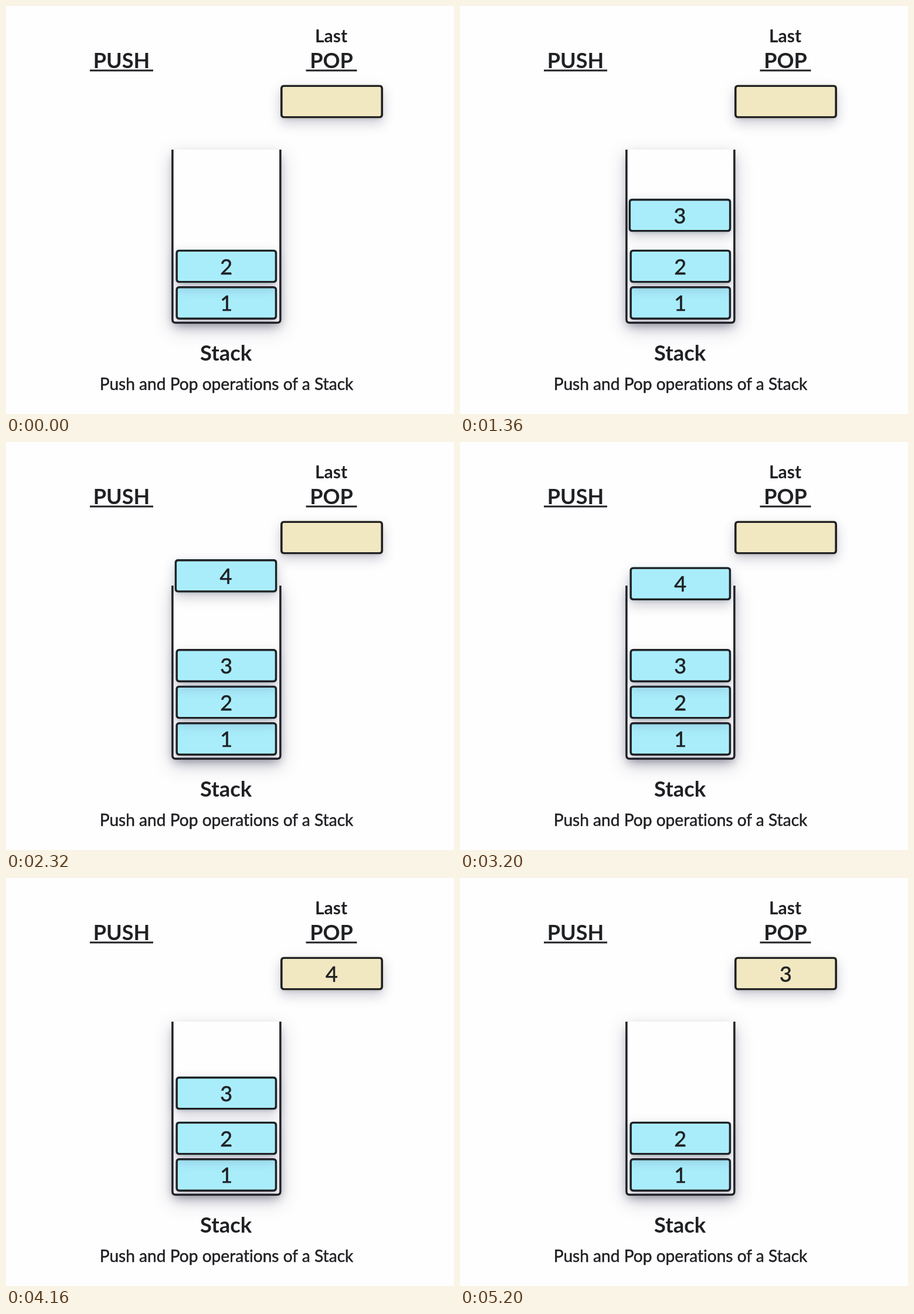
Animation of 764x696 px, one loop 5440 ms. Source, as an HTML page:

```html
<!DOCTYPE html>
<html lang="en">
<head>
<meta charset="utf-8">
<title>Stack push and pop</title>
<style>
  html, body { margin: 0; width: 100%; height: 100%; overflow: hidden; background: #fefefe; }
  #stage { position: relative; width: 764px; height: 696px; overflow: hidden; font-family: Lato, sans-serif; color: #202124; }
  #stage > * { position: absolute; box-sizing: border-box; }
  svg { left: 0; top: 0; }
  svg text { fill: #202124; text-anchor: middle; font-weight: 700; font-size: 36px; }
  svg .caption { font-size: 28.1px; font-weight: 400; font-variant-ligatures: none; stroke: #202124; stroke-width: .5px; }
  #well {
    left: 282px; top: 245px; width: 188px; height: 297px; border-radius: 0 0 7px 7px;
    box-shadow: rgba(50,50,93,.25) 0 10px 30px 0, rgba(0,0,0,.25) 0 6px 14px -4px;
  }
  .block {
    left: 0; top: 0; height: 57px; border-radius: 6px;
    font-size: 36px; line-height: 57px; text-align: center; -webkit-text-stroke: .6px #202124;
  }
</style>
</head>
<body>
<div id="stage">
  <div id="well"></div>
  <svg width="764" height="696" viewBox="0 0 764 696">
    <text x="197" y="106">PUSH</text>
    <rect x="143" y="108.5" width="108" height="3" fill="#202124"/>
    <text x="555" y="106">POP</text>
    <rect x="511.5" y="108.5" width="87" height="3" fill="#202124"/>
    <text x="554.5" y="62" style="font-size:30px">Last</text>
    <text x="375.2" y="605" style="font-size:36.4px">Stack</text>
    <text class="caption" x="376" y="654.5">Push and Pop operations of a Stack</text>
    <path d="M283.9 245V535q0 5.2 5.2 5.2H462.7q5.2 0 5.2-5.2V245" fill="none" stroke="#202124" stroke-width="3.5"/>
  </svg>
</div>
<script>
const LOOP = 5440, TICK = 80;
const TOP = 134.5, PUSH_X = 109, MID_X = 287.5, REST_X = 289.3, POP_X = 468;
const WIDE = 175, SNUG = 173;
const BLUE = [169, 237, 251], CREAM = [241, 232, 194];
const stage = document.getElementById("stage");

const clamp = v => Math.min(1, Math.max(0, v));
const mix = (a, b, p) => a + (b - a) * p;
const ramp = (t, start, span) => clamp((t - start) / span);
const ease = (t, start, span) => (1 - Math.cos(Math.PI * ramp(t, start, span))) / 2;
const restY = n => 478 - 62.5 * (n - 1);

function makeBlock(label) {
  const el = document.createElement("div");
  el.className = "block";
  el.textContent = label;
  stage.appendChild(el);
  return el;
}

// The outline is an inset shadow, so it can be thinner than whole pixels
function place(el, x, y, w, tint = 0, alpha = 1, shade = 1 - tint) {
  const s = el.style;
  s.transform = `translate(${x}px, ${y}px)`;
  s.width = w + "px";
  s.opacity = alpha;
  s.background = `rgb(${BLUE.map((c, i) => Math.round(mix(c, CREAM[i], tint)))})`;
  s.boxShadow = `inset 0 0 0 3.6px #202124, rgba(50,50,93,${.25 * shade}) 0 8px 20px 0, ` +
    `rgba(0,0,0,${.2 * shade}) 0 3px 7px -3px`;
}

const last = makeBlock("");
place(last, POP_X, TOP, WIDE, 1, 1, 1);

for (const n of [1, 2]) place(makeBlock(n), REST_X, restY(n), SNUG);

// Start times in ms of each stage of a block's trip
const movers = [
  { n: 4, show: 1400, slide: 1585, drop: 2069, fall: 560, rise: 2872, exit: 3350 },
  { n: 3, show: 200, slide: 385, drop: 945, fall: 530, rise: 4051, exit: 4540 }
];
for (const m of movers) m.el = makeBlock(m.n);

function move(m, t) {
  const home = restY(m.n);
  if (t < m.drop + m.fall) {
    const x = mix(PUSH_X, MID_X, ease(t, m.slide, 560));
    const y = mix(TOP, home, ease(t, m.drop, m.fall));
    place(m.el, x, y, WIDE, 0, ramp(t, m.show, 160));
  } else {
    const out = ease(t, m.exit, 650);
    const y = mix(home, TOP, ease(t, m.rise, 660));
    place(m.el, mix(REST_X, POP_X, out), y, mix(SNUG, WIDE, out), clamp(out * 2 - 1), out < 1 ? 1 : 0);
  }
}

function draw(t) {
  for (const m of movers) move(m, t);
  const gone = movers.filter(m => t >= m.exit + 650).pop();
  last.textContent = gone ? gone.n : "";
}

function frame(now) {
  draw(Math.floor(now % LOOP / TICK) * TICK);
  requestAnimationFrame(frame);
}
draw(0);
requestAnimationFrame(frame);
</script>
</body>
</html>
```
